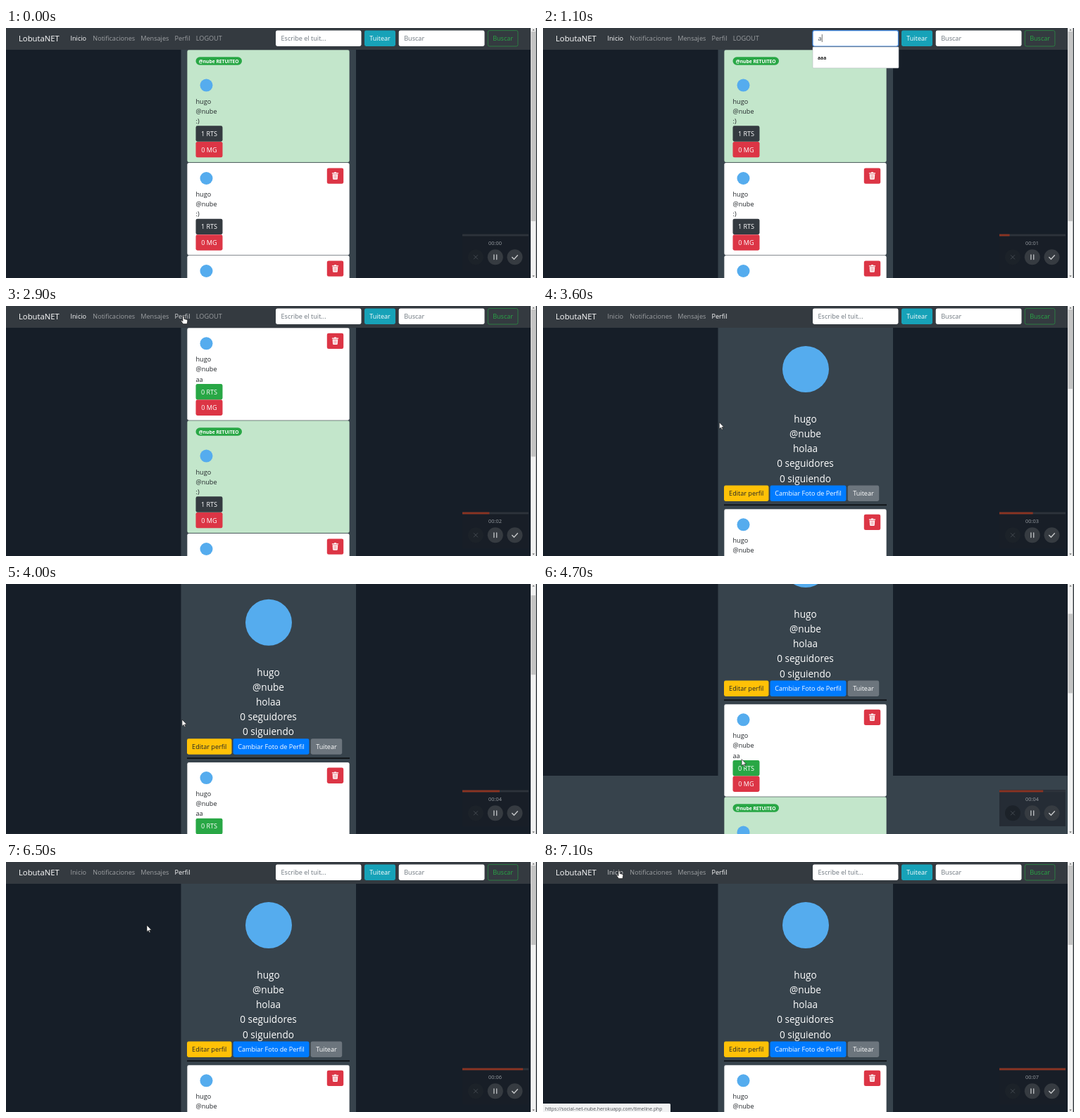
These frames come from a looping animation (754x356 px, 7.2 s). An HTML page:

```html
<!DOCTYPE html>
<html lang="es">
<head>
<meta charset="utf-8">
<title>LobutaNET</title>
<style>
html, body { margin: 0; width: 100%; height: 100%; overflow: hidden; background: #37434c; }
svg { display: block; width: 754px; height: 356px; }
text { font-family: "Open Sans", "Noto Sans", sans-serif; font-size: 9.1px; white-space: pre; }
</style>
</head>
<body>
<svg id="stage" viewBox="0 0 754 356" xmlns="http://www.w3.org/2000/svg"></svg>
<script>
const LOOP = 7200, STEP = 100;
const BRAND = 'LobutaNET', USER = 'hugo', HANDLE = '@nube';
const HOST = 'social-net-nube.herokuapp.com';
const RED = '#dc3545', GREEN = '#28a745', DARK = '#343a40', BLUE = '#55acee';
const stage = document.getElementById('stage');

const LOAD_TWEET = 2300, LOAD_PROFILE = 3300;
const SHARED = 5100, LIKED = 5700;

// Pointer path: time, x, y, shape
const path = [
  [200, 485, 128, 'arrow'], [500, 390, 62, 'arrow'], [700, 420, 20, 'beam'], [900, 420, 18, 'none'],
  [1500, 424, 20, 'beam'], [1700, 528, 16, 'hand'], [1800, 528, 16, 'hand'], [2000, 420, 26, 'beam'],
  [2100, 375, 26, 'arrow'], [2700, 252, 14, 'hand'], [3200, 252, 14, 'hand'], [3300, 252, 18, 'arrow'],
  [3700, 250, 193, 'arrow'], [4400, 250, 193, 'arrow'], [4800, 288, 260, 'hand'], [5100, 288, 260, 'hand'],
  [5300, 288, 283, 'hand'], [5600, 288, 283, 'hand'], [5700, 264, 215, 'arrow'], [5800, 239, 134, 'arrow'],
  [6500, 200, 90, 'arrow'], [6900, 108, 12, 'hand'], [7200, 108, 12, 'hand']
];

const clamp = v => Math.max(0, Math.min(1, v));
const ease = (t, a, d) => { const u = clamp((t - a) / d); return u * u * (3 - 2 * u); };

function mix(a, b, u) {
  const part = (c, i) => parseInt(c.slice(i, i + 2), 16);
  return 'rgb(' + [1, 3, 5].map(i => Math.round(part(a, i) + (part(b, i) - part(a, i)) * u)) + ')';
}

const rect = (x, y, w, h, fill, r = 0, more = '') =>
  `<rect x="${x}" y="${y}" width="${w}" height="${h}" rx="${r}" fill="${fill}" ${more}/>`;
const circle = (x, y, r, fill) => `<circle cx="${x}" cy="${y}" r="${r}" fill="${fill}"/>`;
const text = (x, y, s, fill, more = '') => `<text x="${x}" y="${y}" fill="${fill}" ${more}>${s}</text>`;
const label = (x, y, s, fill, more = '') => text(x, y, s, fill, 'text-anchor="middle" ' + more);
const shift = (y, s) => `<g transform="translate(0 ${y})">${s}</g>`;
const line = (d, color, w) =>
  `<path d="${d}" fill="none" stroke="${color}" stroke-width="${w}" stroke-linecap="round"/>`;

function button(x, y, w, s, fill, color = '#fff', more = '') {
  return rect(x, y, w, 22.4, fill, 2.4, more) + label(x + w / 2, y + 14.6, s, color);
}

function trash(x, y) {
  return rect(x, y, 23.4, 22.4, RED, 2.4) +
    `<g transform="translate(${x + 7.1} ${y + 5.9}) scale(1.1)"><path fill="#fff" d="M0 .8H2.4L3 0H5.3L5.9.8H8.3V2H0Z` +
    'M.7 2.7H7.6L7.2 8.6Q7.1 9.5 6.3 9.5H2Q1.2 9.5 1.1 8.6Z"/>' +
    line('M2.6 4v4m1.55 -4v4m1.55 -4v4', RED, .45) + '</g>';
}

function card(y, c) {
  const h = c.shared ? 160.5 : 132, o = y + (c.shared ? 28.3 : 0);
  let s = rect(257.3, y + .3, 230.4, h - .6, c.shared ? '#c3e6cb' : '#fff', 2.4,
    'stroke="#000" stroke-opacity=".13" stroke-width=".6"');
  if (c.shared) {
    s += rect(269.5, y + 10.3, 65.5, 11.4, GREEN, 5.7) +
      label(302.2, y + 18.5, HANDLE + ' RETUITEO', '#fff', 'style="font-size:6.7px;font-weight:700"');
  } else s += trash(455.8, y + 7.7);
  s += circle(284.5, o + 22.3, 9, BLUE);
  [USER, HANDLE, c.msg].forEach((m, i) => s += text(269.5, o + 48.2 + i * 14.15, m, '#212529'));
  s += button(269.5, o + 80, 38, c.rts + ' RTS', c.rtFill || (c.rts ? DARK : GREEN));
  s += button(269.5, o + 102.6, 38, c.mg + ' MG', c.mgFill || RED, '#fff',
    c.ring ? 'stroke="#8992a8" stroke-width="2"' : '');
  return s;
}

const field = (x, w, s, color, on) => rect(x, 3.6, w, 22.4, '#fff', 2.4,
  on ? 'stroke="#3f86e0" stroke-width="1.2"' : '') + text(x + 7.5, 18.2, s, color);

function navbar(t, profile) {
  const hoverPerfil = t >= 2700 && t < LOAD_PROFILE, hoverInicio = t >= 6900;
  const dim = 'rgba(255,255,255,.52)', mid = 'rgba(255,255,255,.8)';
  let s = rect(0, 0, 745, 31, DARK) + text(18, 19.2, BRAND, '#fff', 'style="font-size:11.3px"');
  s += text(91.5, 18.4, 'Inicio', profile ? (hoverInicio ? mid : dim) : '#fff');
  s += text(123.3, 18.4, 'Notificaciones', dim) + text(191.3, 18.4, 'Mensajes', dim);
  s += text(239.5, 18.4, 'Perfil', profile ? '#fff' : hoverPerfil ? mid : dim);
  if (!profile) s += text(269.8, 18.4, 'LOGOUT', dim);

  const typed = t < 1000 || t >= LOAD_TWEET ? '' : t < 1300 ? 'a' : 'aa';
  const focus = t >= 800 && t < 1800;
  s += field(383, 121.5, typed || 'Escribe el tuit...', typed ? '#495057' : '#6c757d', focus);
  if (focus) s += rect(390.8 + typed.length * 5.05, 9, .7, 11, '#333');
  const sent = t >= 1800 && t < LOAD_TWEET, over = t >= 1700 && t < 1800;
  s += button(509, 3.6, 44, 'Tuitear', sent ? '#117a8b' : over ? '#138496' : '#17a2b8', '#fff',
    sent ? 'stroke="#17a2b8" stroke-opacity=".6" stroke-width="3"' : '');
  s += field(557.7, 121.8, 'Buscar', '#6c757d');
  s += button(684.3, 3.6, 42.6, 'Buscar', 'none', GREEN, `stroke="${GREEN}" stroke-width=".6"`);
  if (t >= 1000 && t < 1500) {
    s += rect(383, 27, 122, 30, '#fff', 1, 'stroke="#b9bec4" stroke-width=".6"') +
      text(390, 44.8, 'aaa', '#222', 'style="font-size:6.8px;font-weight:700"');
  }
  return s;
}

const old = [{ shared: true, msg: ':)', rts: 1, mg: 0 }, { msg: ':)', rts: 1, mg: 0 }, { msg: ':)', rts: 0, mg: 0 }];

function feed(y, list) {
  return list.map(c => { const s = card(y, c); y += c.shared ? 160.7 : 132; return s; }).join('');
}

function profileHead() {
  let s = circle(373, 89.5, 33, BLUE);
  [USER, HANDLE, 'holaa', '0 seguidores', '0 siguiendo'].forEach((m, i) =>
    s += label(372.5, 165.3 + i * 21.2, m, '#fff', 'style="font-size:13.6px"'));
  return s + button(257, 255, 63.5, 'Editar perfil', '#ffc107', '#212529') +
    button(322.5, 255, 108, 'Cambiar Foto de Perfil', '#007bff') +
    button(432.7, 255, 44.5, 'Tuitear', '#6c757d') + rect(257, 282, 231, 1.6, '#0b0d10');
}

function scrollbar(scroll, full) {
  return rect(745, 0, 9, 356, '#f1f1f1') + rect(752.6, 0, 1.4, 356, '#30363b') +
    rect(745.6, 5 + scroll * 346 / full, 6.6, 346 * 356 / full, '#c4c4c4') +
    '<path d="M747.3 3.4h3.4L749 1.5ZM747.3 352.6h3.4L749 354.5Z" fill="#666"/>';
}

function page(t) {
  const profile = t >= LOAD_PROFILE;
  const scroll = 59 * (ease(t, 3887, 200) + ease(t, 4200, 200) - ease(t, 6000, 200) - ease(t, 6300, 200));
  const fresh = { msg: 'aa', rts: +(t >= SHARED), mg: +(t >= LIKED) };
  if (t >= 4800 && t < SHARED) fresh.rtFill = '#218838';
  if (t >= 5300 && t < LIKED) fresh.mgFill = '#c82333';
  if (t >= LIKED) {
    fresh.mgFill = mix(RED, DARK, clamp((t - 5725) / 150));
    fresh.ring = t < 6900;
  }
  let s = rect(0, 31, 248.5, 360, '#161e28') + rect(497, 31, 248, 360, '#161e28');
  if (profile) s += shift(.5, profileHead() + feed(288.5, [fresh, ...old]));
  else s += feed(31, t < LOAD_TWEET ? old : [fresh, ...old]);
  const full = profile ? 1090 : t < LOAD_TWEET ? 456 : 588;
  return shift(-scroll, s + navbar(t, profile)) + scrollbar(scroll, full);
}

function status(t) {
  let s, w, a;
  if (t >= 2000 && t < LOAD_TWEET) [s, w, a] = [`Esperando a ${HOST}...`, 158, t < 2100 ? .38 : 1];
  else if (t >= 3000 && t < LOAD_PROFILE) [s, w, a] = [`https://${HOST}/perfil.php`, 172, 1];
  else if (t >= 7000) [s, w, a] = [`https://${HOST}/timeline.php`, 181, 1];
  else return '';
  return `<g opacity="${a}">` + rect(-2, 344, w + 2, 14, '#f1f2f3', 1.5) +
    text(3, 353.8, s, '#4d5156', 'style="font-size:6.8px"') + '</g>';
}

function recorder(t) {
  const clock = '00:0' + Math.floor(t / 1000);
  return rect(648, 293, 94, 52, '#1b2027', 0, 'opacity=".62"') +
    rect(648, 293.6, 94, 2.8, '#2d333b') + rect(648, 293.6, 94 * clamp(t / 7100), 2.8, '#8b3322') +
    label(694.5, 309.4, clock, '#9a9fa4', 'style="font-size:7.4px"') +
    circle(667, 326.3, 11, '#1c2229') + line('M664.3 323.6l5.4 5.4m0 -5.4l-5.4 5.4', '#434950', 1) +
    circle(694.8, 326.3, 11, '#363b41') + line('M692.9 323v6.6m3.8 -6.6v6.6', '#b9bcbf', 1.4) +
    circle(722.5, 326.3, 11, '#363b41') + line('M718.7 326.5l2.7 2.7 5 -5.4', '#c6c8ca', 1.4);
}

const shapes = {
  arrow: '<path d="M0 0V9.4L2.2 7.4 3.6 10.5 5 9.9 3.6 6.9H6.6Z" fill="#fff" stroke="#111" stroke-width=".6"/>',
  hand: '<path d="M-1 1Q0-.6 1 1V4.4L4.8 5.4Q6 5.8 5.8 7.2L5 11.6H-.4L-3.4 7.6Q-3.4 6.2-2 6.8L-1 7.8Z" fill="#fff" stroke="#111" stroke-width=".6"/>',
  beam: line('M-1.8-3.6H1.8M0-3.6V3.8M-1.8 3.8H1.8', '#222', 1.7) +
    line('M-1.8-3.6H1.8M0-3.6V3.8M-1.8 3.8H1.8', '#eee', .8),
  none: ''
};

function pointer(t) {
  const i = path.findIndex((p, k) => t >= p[0] && k + 1 < path.length && t < path[k + 1][0]);
  if (i < 0) return '';
  const [t0, x0, y0, kind] = path[i], [t1, x1, y1] = path[i + 1];
  const u = ease(t, t0, t1 - t0);
  return `<g transform="translate(${x0 + (x1 - x0) * u} ${y0 + (y1 - y0) * u})">${shapes[kind]}</g>`;
}

let shown = -1;
const start = performance.now();
function draw(now) {
  const t = Math.floor(Math.max(0, now - start) % LOOP / STEP) * STEP;
  if (t !== shown) {
    shown = t;
    stage.innerHTML = rect(0, 0, 754, 356, '#37434c') + page(t) + status(t) + recorder(t) + pointer(t);
  }
  requestAnimationFrame(draw);
}
draw(start);
</script>
</body>
</html>
```
